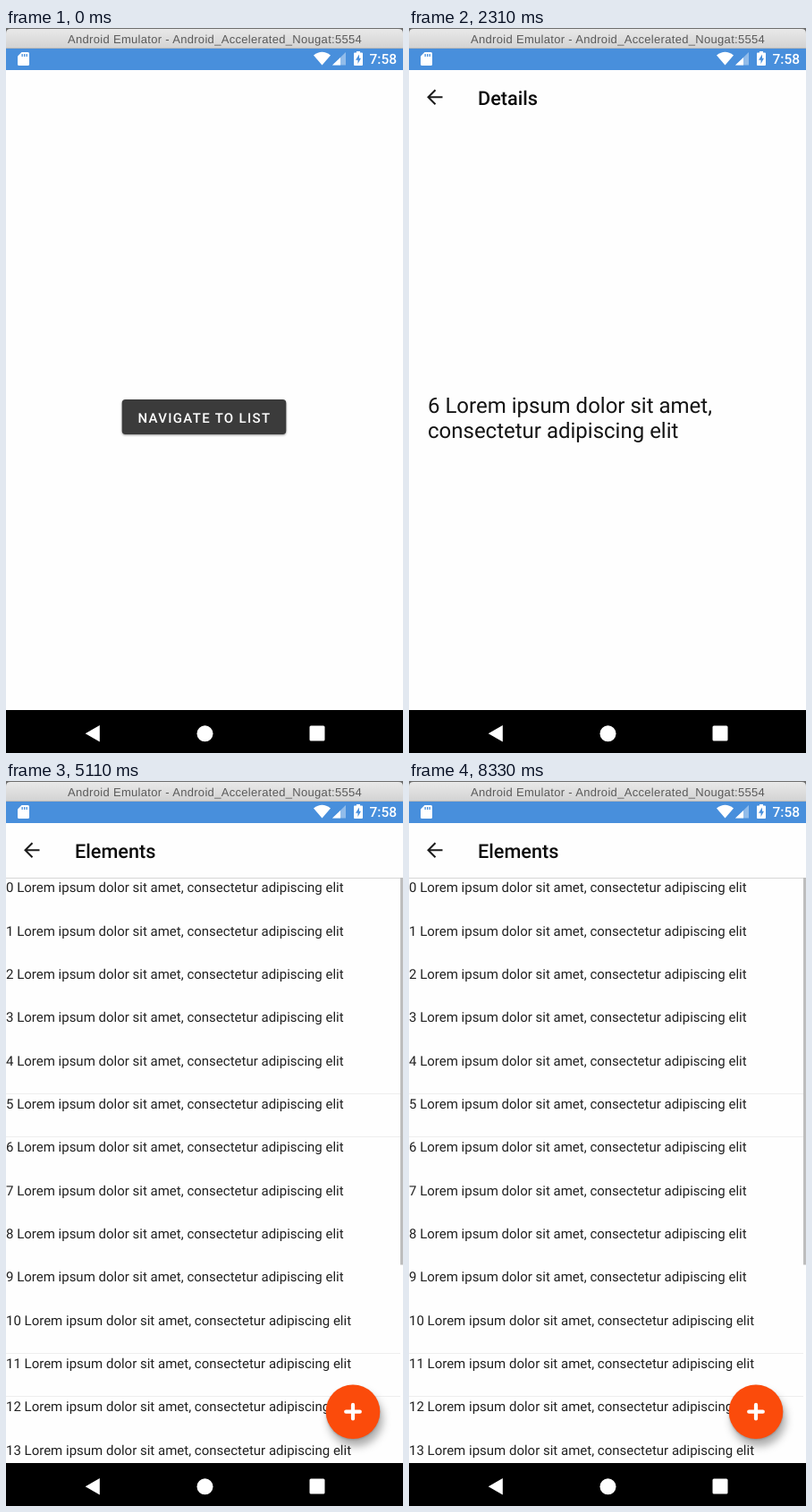
An HTML page for the animation above (8.4 s loop, 444 px wide and 810 px high).

```html
<!DOCTYPE html>
<html lang="en">
<head>
<meta charset="utf-8">
<title>List navigation</title>
<style>
  html, body { margin: 0; width: 100%; height: 100%; overflow: hidden; background: #fff; }
  svg { display: block; font-family: Roboto, sans-serif; text-rendering: geometricPrecision; }
  text { white-space: pre; }
  .medium { font-weight: 500; }
  #fab { filter: drop-shadow(0 1px 1px rgba(0, 0, 0, .2)) drop-shadow(3px 8px 5px rgba(0, 0, 0, .32)); }
</style>
</head>
<body>
<svg width="444" height="810" viewBox="0 0 444 810">
  <defs>
    <linearGradient id="chrome" x2="0" y2="1">
      <stop stop-color="#e9e9e9"/><stop offset="1" stop-color="#d2d2d2"/>
    </linearGradient>
    <clipPath id="content"><path d="M0 107H444V762H0Z"/></clipPath>
  </defs>
  <path fill="#fefefe" d="M0 0H444V810H0Z"/>

  <!-- Home -->
  <rect x="129.7" y="415" width="183.6" height="39" rx="4" fill="#3b3b3b"
        style="filter: drop-shadow(0 1.5px 1px rgba(0, 0, 0, .4))"/>
  <text class="medium" x="147.4" y="440.5" font-size="15" letter-spacing="1.32" fill="#fff">NAVIGATE TO LIST</text>

  <g clip-path="url(#content)">
    <g id="list">
      <path fill="#fefefe" d="M0 107H444V762H0Z"/>
      <path fill="#d6d6d6" d="M0 108H444V109H0Z"/>
      <g id="rows" font-size="15" fill="#212121"></g>
      <path fill="#bdbdbd" d="M441 108H444V540.5H441Z"/>
      <g id="fab">
        <g id="fabBody">
          <circle r="30.3" fill="#fb4b0b"/>
          <path d="M-7.8 0H7.8M0 -7.8V7.8" stroke="#fff" stroke-width="4.2" stroke-linecap="round"/>
        </g>
      </g>
    </g>
    <g id="details">
      <path fill="#fefefe" d="M0 107H444V762H0Z"/>
      <g font-size="24" fill="#141414">
        <text x="21" y="430">6 Lorem ipsum dolor sit amet,</text>
        <text x="21" y="458">consectetur adipiscing elit</text>
      </g>
    </g>
    <g id="newItem">
      <path fill="#fefefe" d="M0 107H444V762H0Z"/>
      <text x="222" y="444" font-size="24" fill="#141414" text-anchor="middle">Create new item here ;)</text>
    </g>
  </g>

  <g id="header">
    <path fill="#fefefe" d="M0 47H444V107H0Z"/>
    <path d="M37.5 77.3H22M29.5 69.3L21.5 77.3L29.5 85.3" fill="none" stroke="#1c1c1c" stroke-width="2"/>
    <text id="title" class="medium" x="77" y="86" font-size="21.7" fill="#0c0c0c"></text>
  </g>

  <!-- Window title and status bar -->
  <path fill="#6e6e6e" d="M0 0H444V8H0Z"/>
  <path fill="url(#chrome)" d="M0 23V6Q0 1 5 1H439Q444 1 444 6V23Z"/>
  <path fill="#b9b9b9" d="M0 22H444V23H0Z"/>
  <text x="69" y="17" font-size="13" letter-spacing=".31" fill="#5a5a5a"
        font-family="Liberation Sans, sans-serif">Android Emulator - Android_Accelerated_Nougat:5554</text>
  <path fill="#488fdc" d="M0 23H444V47H0Z"/>
  <g fill="#fff">
    <path d="M17.5 27H24.5Q26 27 26 28.5V40.5Q26 42 24.5 42H14.5Q13 42 13 40.5V31.5Z"/>
    <path d="M344 30.5Q353.5 23 363 30.5L353.5 41.5Z"/>
    <path d="M380 27V41.5H365Z" opacity=".4"/>
    <path d="M374 33V41.5H365Z"/>
    <path d="M392 26H396V27.5H398Q399 27.5 399 28.5V41Q399 42 398 42H390Q389 42 389 41V28.5Q389 27.5 390 27.5H392Z"/>
    <path fill="#488fdc" d="M395 29.5L391 35.8H393.5V40L397 33.8H395Z"/>
    <text class="medium" x="406.5" y="40.2" font-size="15.5">7:58</text>
  </g>
  <path fill="#488fdc" d="M17.5 29H18.8V32H17.5ZM20 29H21.3V32H20ZM22.5 29H23.8V32H22.5Z"/>

  <!-- Navigation bar -->
  <path d="M0 762H444V810H0Z"/>
  <g fill="#fff">
    <path d="M104.8 779V797.5L88.7 788.3Z"/>
    <circle cx="222.5" cy="788.3" r="9"/>
    <rect x="339.5" y="779.6" width="17" height="17" rx="1.5"/>
  </g>
</svg>
<script>
const LOOP = 8400, STEP = 70, OPEN = 330, CLOSE = 280;
const LIST_OPEN = 450;
const VISITS = [
  { id: 'details', title: 'Details', open: 1990, close: 3390 },
  { id: 'newItem', title: 'New item', open: 5210, close: 6890 },
];

const $ = id => document.getElementById(id);
const clamp = x => Math.min(1, Math.max(0, x));
const openProgress = x => 1 - (1 - clamp(x)) ** 3;
const closeProgress = x => 1 - (1 - clamp(x)) ** 2;
const smooth = x => (x = clamp(x), x * x * (3 - 2 * x));

const PITCH = 48.33;
for (let i = 0; i < 14; i++) {
  const y = 124.3 + i * PITCH;
  const divider = [5, 6, 11, 12].includes(i)
    ? `<path d="M0 ${Math.round(y - 17)}h441v1h-441z" fill="#eee"/>` : '';
  $('rows').innerHTML += divider +
    `<text x="0" y="${y}">${i} Lorem ipsum dolor sit amet, consectetur adipiscing elit</text>`;
}

// Cards fade while shrinking to, or growing from, their natural size.
function showCard(id, visible) {
  const card = $(id), scale = 1 + .085 * (1 - visible);
  card.style.display = visible > 0 ? '' : 'none';
  card.setAttribute('opacity', visible);
  card.setAttribute('transform', `translate(222 435) scale(${scale}) translate(-222 -435)`);
}

function render(t) {
  const listVisible = openProgress((t - LIST_OPEN) / OPEN);
  showCard('list', listVisible);
  $('header').setAttribute('opacity', listVisible);

  let title = 'Elements', listShown = LIST_OPEN;
  for (const { id, title: name, open, close } of VISITS) {
    showCard(id, openProgress((t - open) / OPEN) * (1 - closeProgress((t - close) / CLOSE)));
    if (t >= open && t < close + CLOSE) title = name;
    if (t >= close) listShown = close;
  }
  if ($('title').textContent !== title) $('title').textContent = title;

  const size = smooth((t - listShown - 240) / 315);
  $('fab').style.display = size > 0 ? '' : 'none';
  $('fabBody').setAttribute('transform', `translate(388 704.7) scale(${size})`);
}

const start = performance.now();
function tick() {
  const t = (performance.now() - start) % LOOP;
  render(Math.floor(t / STEP) * STEP);
  requestAnimationFrame(tick);
}
tick();
</script>
</body>
</html>
```
